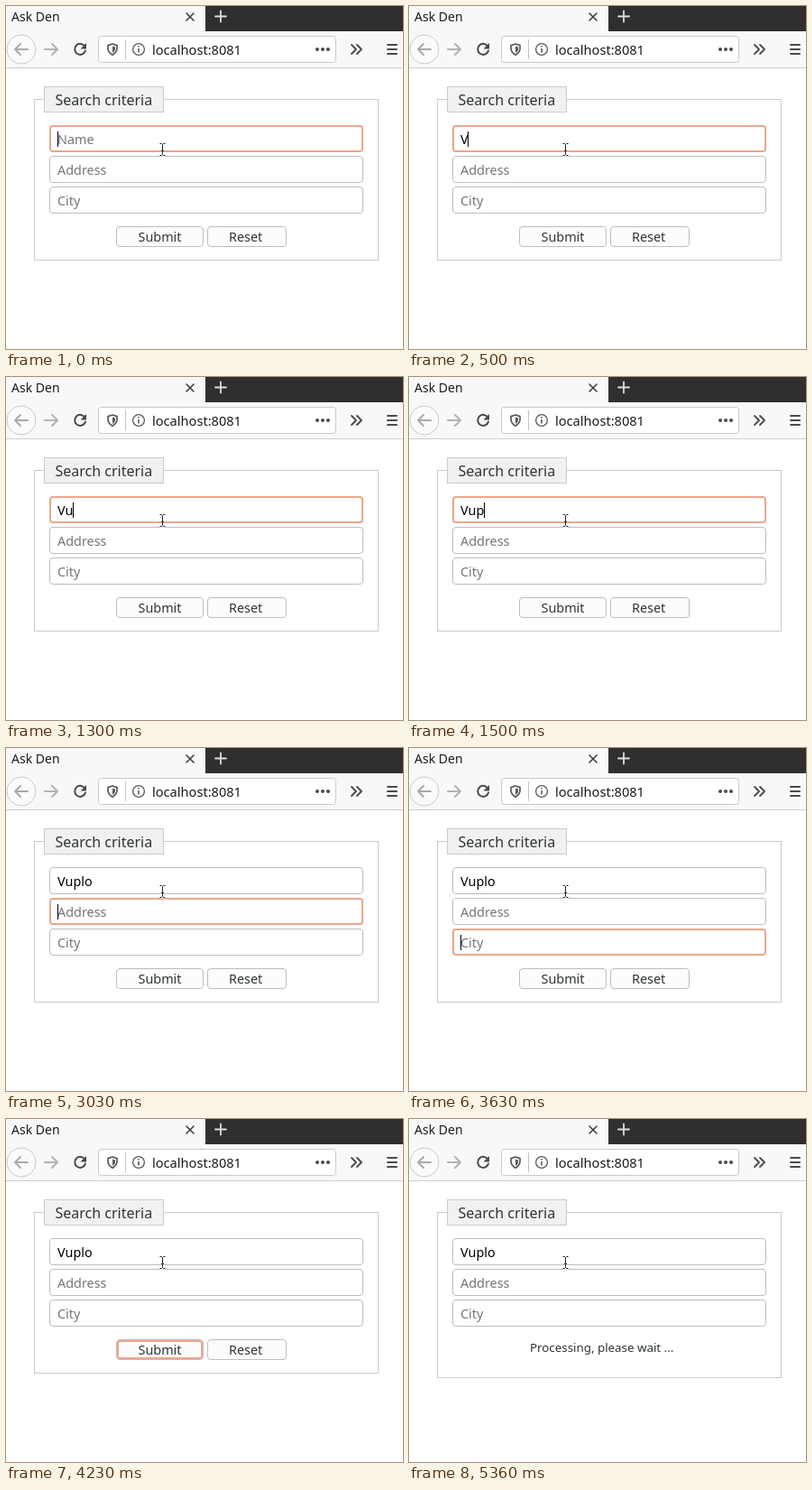
An HTML page that plays this animation: 440 by 380 pixels, repeating every 8000 ms.

```html
<!DOCTYPE html>
<html lang="en">
<head>
<meta charset="utf-8">
<title>Search form</title>
<style>
  html, body { margin: 0; width: 100%; height: 100%; overflow: hidden; background: #fff; }
  svg { display: block; width: 440px; height: 380px; font-family: "Noto Sans", "Open Sans", sans-serif; font-size: 14.4px; }
  .line { fill: none; stroke-linecap: round; stroke-linejoin: round; stroke-width: 2; }
  .box { fill: #fff; stroke: #bdbdbd; }
  .label { fill: #2e3436; }
</style>
</head>
<body>
<svg viewBox="0 0 440 380">
  <rect width="440" height="380" fill="#fff"/>

  <!-- browser chrome -->
  <rect width="440" height="68" fill="#f8f8f8"/>
  <rect x="221" width="219" height="28" fill="#302f2e"/>
  <rect y="68" width="440" height="1" fill="#cfcfcf"/>
  <text x="6" y="17" font-size="14" fill="#1c1c1f">Ask Den</text>
  <path d="M200 8l8 8m0-8l-8 8" class="line" stroke="#3c3c40" style="stroke-width:1.6"/>
  <path d="M232 11.5h12m-6-6v12" class="line" stroke="#dedede" style="stroke-width:1.8"/>

  <circle cx="17" cy="48" r="16" fill="#fafafa" stroke="#cacaca"/>
  <path id="arrow" d="M24 48H10m6-6l-6 6l6 6" class="line" stroke="#aaaaac"/>
  <path d="M43 48h14m-6-6l6 6l-6 6" class="line" stroke="#b3b3b5"/>
  <path d="M87.5 45A6 6 0 1 0 88 49.5" class="line" stroke="#48484c"/>
  <path d="M89 41v6.5h-6.5z" fill="#48484c"/>

  <rect x="102.5" y="33.5" width="263" height="29" rx="3" fill="#fff" stroke="#c9c9c9"/>
  <path d="M118 42l5 1.6v3.4c0 3-2 5.500-5 7.200c-3-1.700-5-4.200-5-7.200v-3.400z" class="line" stroke="#59595d" style="stroke-width:1.7"/>
  <path d="M118 44.500l3 1v2c0 2-1.200 3.400-3 4.500z" fill="#59595d"/>
  <path d="M132.5 37v22" stroke="#c2c2c2"/>
  <circle cx="147" cy="48" r="6.400" fill="none" stroke="#59595d" stroke-width="1.300"/>
  <path d="M147 47v4.500M147 44v1.500" stroke="#59595d" stroke-width="1.600"/>
  <text x="162" y="53.500" font-size="14.600" fill="#1a1a1c">localhost:8081</text>
  <g fill="#4a4a4e">
    <circle cx="345" cy="48" r="2"/><circle cx="351" cy="48" r="2"/><circle cx="357" cy="48" r="2"/>
  </g>
  <path d="M383 43l5 5l-5 5m6-10l5 5l-5 5" class="line" stroke="#4a4a4e" style="stroke-width:1.800"/>
  <path d="M423 43h10m-10 5h10m-10 5h10" class="line" stroke="#4a4a4e"/>

  <!-- form -->
  <rect id="frame" x="31.5" y="103.5" width="381" height="178" fill="none" stroke="#cbcbcb"/>
  <rect x="42.5" y="89.5" width="132" height="28" fill="#f1f1f1" stroke="#cbcbcb"/>
  <text x="54.500" y="110" font-size="16" class="label">Search criteria</text>
  <g id="fields"></g>
  <g id="buttons"></g>
  <text id="wait" x="134" y="258" font-size="13.333" class="label">Processing, please wait ...</text>
  <rect id="caret" y="139" width="1" height="17" fill="#000"/>

  <!-- mouse pointer -->
  <path d="M170.500 152.500h2l1 1l1-1h2M173.500 153.500v11M170.500 165.500h2l1-1l1 1h2M172 160.500h3" fill="none" stroke="#fff" stroke-width="2.600" opacity=".7"/>
  <path d="M170.500 152.500h2l1 1l1-1h2M173.500 153.500v11M170.500 165.500h2l1-1l1 1h2M172 160.500h3" fill="none" stroke="#222"/>
</svg>
<script>
const LOOP = 8000;
const WORD = "Vuplo";
const KEYS = [500, 1300, 1500, 1700, 1900];
const TABS = [3030, 3630, 4230];
const SUBMIT = 5360;
const ACCENT = "#eca68c";
const $ = id => document.getElementById(id);

function add(parent, tag, attrs, text = "") {
  const el = document.createElementNS("http://www.w3.org/2000/svg", tag);
  for (const k in attrs) el.setAttribute(k, attrs[k]);
  el.textContent = text;
  parent.append(el);
  return el;
}

const fields = ["Name", "Address", "City"].map((hint, i) => {
  const y = 132 + 34 * i;
  return {
    hint, y,
    box: add($("fields"), "rect", { class: "box" }),
    text: add($("fields"), "text", { x: 57, y: y + 21, fill: "#757575" }, hint)
  };
});

function button(x, w, textX, label) {
  add($("buttons"), "rect", { x: x + .5, y: 244.5, width: w - 1, height: 22, rx: 3.5, fill: "#fcfcfc", stroke: "#bdbdbd" });
  add($("buttons"), "text", { x: textX, y: 261, class: "label" }, label);
}
button(122, 97, 146.5, "Submit");
button(223, 88, 247, "Reset");
const ring = add($("buttons"), "rect", { x: 124, y: 246, width: 93, height: 19, rx: 2.5, fill: "none", stroke: ACCENT, "stroke-width": 2 });

const show = (el, on) => el.setAttribute("visibility", on ? "visible" : "hidden");
const count = (times, t) => times.filter(v => t >= v).length;

function outline(f, on) {
  const inset = on ? 1 : .5;
  const attrs = { x: 48 + inset, y: f.y + inset, width: 348 - 2 * inset, height: 30 - 2 * inset, rx: 4 - inset };
  for (const k in attrs) f.box.setAttribute(k, attrs[k]);
  f.box.style.stroke = on ? ACCENT : "";
  f.box.style.strokeWidth = on ? 2 : 1;
}

function draw(t) {
  const typed = WORD.slice(0, count(KEYS, t));
  const focus = count(TABS, t);
  const busy = t >= SUBMIT;
  const name = fields[0].text;

  name.textContent = typed || fields[0].hint;
  name.setAttribute("fill", typed ? "#000" : "#757575");
  fields.forEach((f, i) => outline(f, i === focus));

  show($("caret"), focus < 3);
  if (focus < 3) {
    const w = focus === 0 && typed ? name.getComputedTextLength() : 0;
    $("caret").setAttribute("x", 57 + Math.floor(w));
    $("caret").setAttribute("y", fields[focus].y + 7);
  }

  show($("buttons"), !busy);
  show(ring, focus === 3 && !busy);
  show($("wait"), busy);
  $("frame").setAttribute("height", busy ? 183 : 178);
}

const start = performance.now();
function tick() {
  draw((performance.now() - start) % LOOP);
  requestAnimationFrame(tick);
}
tick();
</script>
</body>
</html>
```
